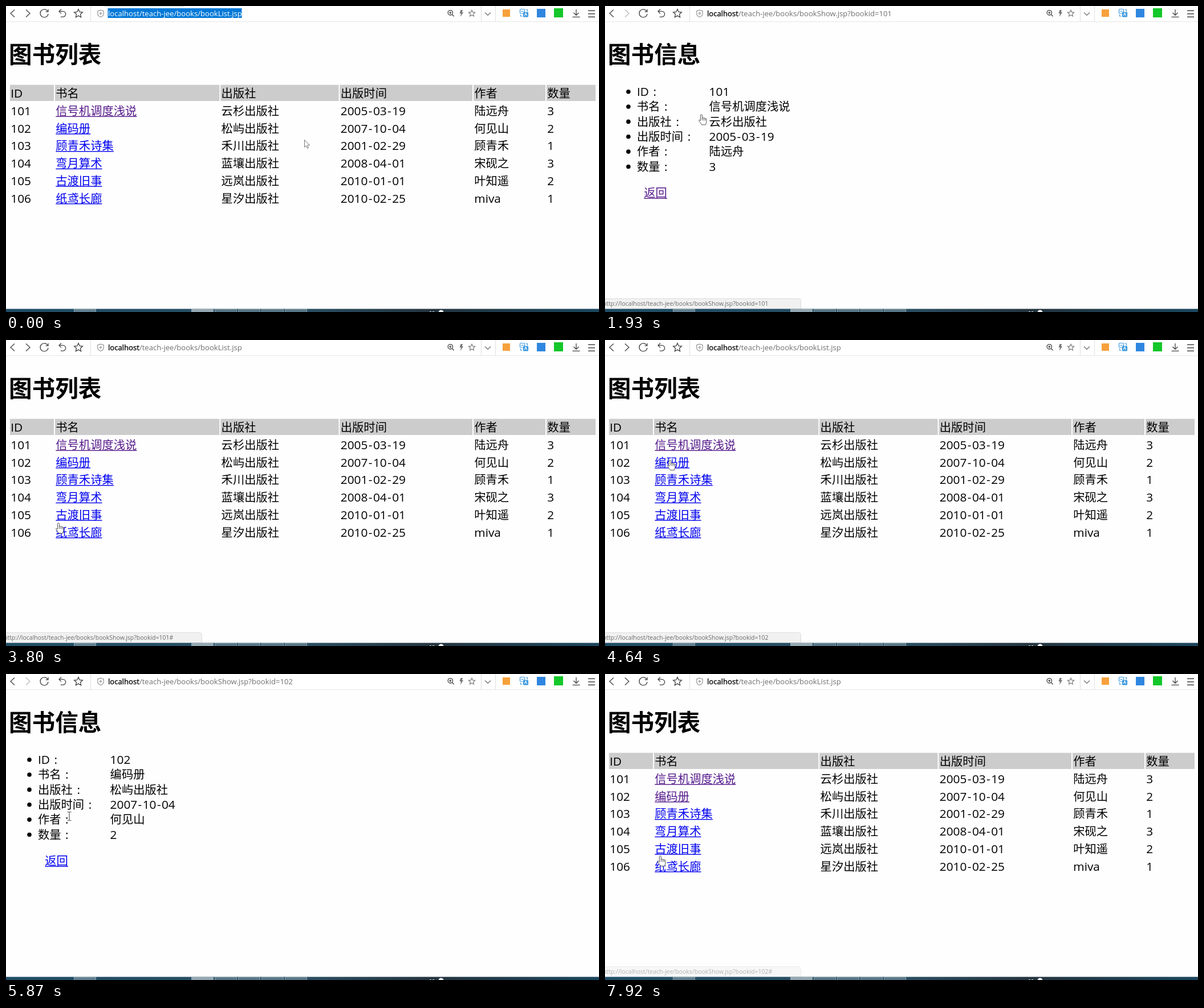
Recreate the animation shown at these times as an HTML page. Size 1040 px wide and 538 px high, loop 7990 ms.

```html
<!DOCTYPE html>
<html lang="zh-CN">
<head>
<meta charset="utf-8">
<title>图书列表</title>
<style>
html, body { margin: 0; width: 100%; height: 100%; overflow: hidden; background: #fff; }
svg { display: block; width: 1040px; height: 538px; }
text { font-family: "Noto Sans CJK SC", "Noto Sans CJK", sans-serif; font-size: 20.3px; }
.latin { font-family: "Open Sans", "Noto Sans", sans-serif; font-size: 20.8px; }
.url { font-family: "Open Sans", "Noto Sans", sans-serif; font-size: 13.1px; }
.small { font-family: "Open Sans", "Noto Sans", sans-serif; font-size: 10.5px; }
.title { font-size: 40.6px; font-weight: 700; }
.icon { fill: none; stroke: #444; stroke-width: 1.3; }
</style>
</head>
<body>
<svg viewBox="0 0 1040 538">
  <defs>
    <linearGradient id="bar">
      <stop offset="0" stop-color="#1f4d66"/><stop offset=".5" stop-color="#2a4f63"/>
      <stop offset=".72" stop-color="#243540"/><stop offset="1" stop-color="#1a475e"/>
    </linearGradient>
    <path id="star" d="M0-7.4 2.2-2.5 7.4-2 3.5 1.6 4.6 6.8 0 4.1-4.6 6.8-3.5 1.6-7.4-2-2.2-2.5Z"/>
  </defs>
  <rect width="1040" height="538" fill="#fff"/>
  <rect y="28" width="1040" height="505" fill="#fefefe"/>
  <g id="page"></g>

  <rect y="27" width="1040" height="1" fill="#e6e6e6"/>
  <g class="icon">
    <path d="M15 6.5 8 13l7 6.5"/>
    <path id="forward" d="M35 6.5 42 13l-7 6.5"/>
    <path d="M73 9.2a7 7 0 1 0 1 4.6M74 5.8v4.3h-4.4"/>
    <path d="M97 5.5 93 9.4l4 4M93.5 9.4h6.3a4.9 4.9 0 0 1 0 9.8h-4"/>
    <use href="#star" x="127" y="13"/>
    <path stroke="#e4e4e4" d="M148.5 0v27M833.5 0v27M858.5 0v27"/>
    <path stroke="#8a8a8a" stroke-width="1.1" d="M166 7.2 171.2 9v4.5q0 4-5.2 6-5.2-2-5.2-6V9ZM163.3 13h5.4M166 10.3v5.4"/>
    <circle cx="779.3" cy="11.8" r="4.2"/>
    <path d="M782.4 15 785.6 18.2M777.2 11.8h4.2M779.3 9.7v4.2"/>
    <path fill="#777" stroke="none" d="M797.5 7h3.5l-1.3 4h2.3l-5 8 .9-6h-2.4Z"/>
    <use href="#star" stroke="#777" stroke-width="1.5" transform="translate(817 12.8) scale(.76)"/>
    <path stroke="#777" d="m840 11.5 5 4.8 5-4.8"/>
    <path d="M1000 6v10M995.5 11.8l4.5 4.5 4.5-4.5M993.5 19.3h13"/>
    <path stroke-width="1.5" d="M1021 8.3h12M1021 13.8h12M1021 19.3h12"/>
  </g>
  <rect x="871" y="6" width="13" height="13" fill="#f6a13c"/>
  <g fill="none" stroke="#3f9be0" stroke-width="1.2">
    <rect x="901.5" y="5.5" width="8" height="7.5" rx="1"/>
    <rect x="907.5" y="11" width="8" height="8" rx="1" fill="#3f9be0"/>
    <path d="M903.5 9.3h4M911.5 6.5h3v3M902.5 15v3h3"/>
    <path stroke="#fff" d="m909.5 17 2-4.5 2 4.5"/>
  </g>
  <rect x="931" y="5" width="15" height="15" fill="#2f86e0"/>
  <rect x="961" y="4" width="16" height="16" fill="#14c72a"/>

  <g id="selection">
    <rect x="173" width="140" height="1" fill="#cfe3d8"/>
    <rect x="178.5" y="4" width="235" height="17" fill="#0078d7"/>
  </g>
  <text class="url" x="179" y="17.8"><tspan id="host" stroke-width=".3">localhost</tspan><tspan id="path"></tspan></text>

  <g id="status">
    <path d="M-1 514.5H339.5q4 0 4 4V533H-1Z" fill="#f1f1f1" stroke="#dcdcdc"/>
    <text class="small" id="link" x="-4" y="526.8" fill="#6a6a6a"></text>
  </g>

  <g id="taskbar"><rect y="532.5" width="1040" height="6" fill="url(#bar)"/></g>

  <g id="cursor" stroke="#555" fill="#fff">
    <path id="arrow" stroke="#777" d="M.5.5V13.3l3-2.7 2 4.6 2-.9-2-4.5h4.1Z"/>
    <path id="hand" d="M-1.6 1.2c0-1.8 3-1.8 3 0v5c.5-1.2 2.6-1 2.7.3.6-1 2.5-.7 2.6.5.7-.8 2.2-.4 2.2 1v4.5c0 2-1.2 3-1.2 5.3h-7.4c0-1.8-3.4-4.5-4.6-7.3-.5-1.4 1.2-2.2 2.7.3ZM1.4 6.2v4M4.1 6.5v4M6.7 7v3.5"/>
    <path id="beam" fill="none" stroke-width="1.2" d="M-3.5-7.5h2.5l1 .8 1-.8h2.5M-3.5 7.5h2.5l1-.8 1 .8h2.5M0-6.7V6.7"/>
  </g>
</svg>
<script>
const $ = id => document.getElementById(id);
const LOOP = 7990, TICK = 77, EM = 20.3, ROW = 30.7, ITEM = 26.35;
const BLUE = '#0000ee', PURPLE = '#551a8b', RED = '#ff0000';

const heads = ['ID', '书名', '出版社', '出版时间', '作者', '数量'];
const edges = [7, 86, 376.3, 585.5, 820, 948, 1036];
const books = [
  ['101', '信号机调度浅说', '云杉出版社', '2005-03-19', '陆远舟', '3'],
  ['102', '编码册', '松屿出版社', '2007-10-04', '何见山', '2'],
  ['103', '顾青禾诗集', '禾川出版社', '2001-02-29', '顾青禾', '1'],
  ['104', '弯月算术', '蓝壤出版社', '2008-04-01', '宋砚之', '3'],
  ['105', '古渡旧事', '远岚出版社', '2010-01-01', '叶知遥', '2'],
  ['106', '纸鸢长廊', '星汐出版社', '2010-02-25', 'miva', '1']
];

// Pointer moves: from, until, then the point reached
const moves = [
  [450, 1290, 168, 193], [1300, 1530, 169, 191], [2310, 3240, 92, 322], [3950, 4640, 114, 211],
  [5560, 5870, 111, 250], [5870, 6410, 179, 228], [6430, 6610, 172, 166],
  [6610, 7200, 107, 306], [7200, 7370, 97, 320]
];

// Each visit: press time, load time, book shown (-1 for the list)
const visits = [[-1e4, -9e3, -1], [1680, 1837, 0], [3560, 3710, -1], [4910, 5100, 1], [7580, 7750, -1]];

// Eased moves, shown in steps of one screen update
function pointer(t) {
  let x = 523, y = 235;
  for (const [from, until, toX, toY] of moves) {
    if (t < from) break;
    const steps = Math.floor((t - from) / TICK + 0.05);
    const p = t >= until ? 1 : Math.min(1, steps * TICK / (until - from));
    const e = p * p * (3 - 2 * p);
    x += (toX - x) * e;
    y += (toY - y) * e;
  }
  return [x, y];
}

function text(x, y, s, fill = '#000') {
  const latin = /^[\w-]+$/.test(s);
  const body = /^\d+-/.test(s)
    ? s.split('-').map((p, i) => i ? `<tspan dx="1.4">-</tspan><tspan dx="1.4">${p}</tspan>` : p).join('')
    : s;
  return `<text x="${x}" y="${y}"${latin ? ' class="latin"' : ''} fill="${fill}">${body}</text>`;
}

const anchor = (x, y, s, fill) => text(x, y, s, fill) +
  `<rect x="${x}" y="${y + 1.6}" width="${s.length * EM}" height="1.4" fill="${fill}"/>`;

const title = s => `<text class="title" x="5" y="100">${s}</text>`;

function listPage(pressed, visited) {
  let out = title('图书列表');
  heads.forEach((head, c) => {
    const x = edges[c] + 1.3, width = edges[c + 1] - edges[c] - 2;
    out += `<rect x="${edges[c]}" y="138.6" width="${width}" height="28.4" fill="#ccc"/>` + text(x, 161, head);
    books.forEach((book, r) => {
      const y = 192 + r * ROW;
      const fill = r === pressed ? RED : r <= visited ? PURPLE : BLUE;
      out += c === 1 ? anchor(x, y, book[c], fill) : text(x, y, book[c]);
    });
  });
  return out;
}

function showPage(n, pressed) {
  let out = title('图书信息');
  heads.forEach((h, i) => {
    const y = 158 + i * ITEM;
    const colon = 56 + (h === 'ID' ? 21 : h.length * EM) + 7.5;
    out += `<circle cx="41" cy="${y - 7.3}" r="3.8"/>` + text(56, y, h) +
      `<text class="latin" x="${colon}" y="${y}">:</text>` + text(182.6, y, books[n][i]);
  });
  return out + anchor(68.3, 336, '返回', pressed ? RED : n ? BLUE : PURPLE);
}

// What lies under the pointer: a link address, plain text or nothing
function under(x, y, shown) {
  if (shown < 0) {
    const r = Math.round((y - 184.5) / ROW);
    const book = books[r];
    const hit = book && Math.abs(y - 184.5 - r * ROW) < 14 && x > 87 && x < 87.3 + book[1].length * EM;
    return hit ? { link: 'bookShow.jsp?bookid=' + book[0] } : {};
  }
  if (y > 314 && y < 342 && x > 68 && x < 109) return { link: `bookShow.jsp?bookid=${books[shown][0]}#` };
  const h = heads[Math.round((y - 150.5) / ITEM)];
  return { text: !!h && x > 56 && x < 56 + (h.length + 1) * EM };
}

let drawn = '';
function draw(t) {
  const at = visits.filter(v => v[1] <= t).length - 1;
  const [, loaded, shown] = visits[at];
  const next = visits[at + 1];
  const pressed = !!next && t >= next[0];
  const [x, y] = pointer(t);

  // A fresh page keeps the old pointer and address for a moment
  const age = Math.floor((t - loaded) / TICK), held = age < 4;
  const spot = held ? under(...pointer(loaded), visits[at - 1][2]) : under(x, y, shown);
  const visited = at >= 3 ? 1 : 0;

  const key = [shown, pressed, visited].join();
  if (key !== drawn) {
    drawn = key;
    $('page').innerHTML = shown < 0 ? listPage(pressed ? next[2] : -1, visited) : showPage(shown, pressed);
  }

  const selected = t < visits[1][0];
  const name = shown < 0 ? 'bookList.jsp' : 'bookShow.jsp?bookid=' + books[shown][0];
  $('selection').style.display = selected ? '' : 'none';
  $('host').setAttribute('fill', selected ? '#fff' : '#000');
  $('host').setAttribute('stroke', selected ? 'none' : '#000');
  $('path').setAttribute('fill', selected ? '#fff' : '#707070');
  $('path').textContent = '/teach-jee/books/' + name;
  $('forward').setAttribute('stroke', shown < 0 ? '#444' : '#bbb');

  const fade = !held || age < 2 ? 1 : age < 3 ? 0.5 : 0;
  $('status').setAttribute('opacity', spot.link ? fade : 0);
  $('link').textContent = spot.link ? 'http://localhost/teach-jee/books/' + spot.link : '';

  const shape = spot.link ? 'hand' : spot.text ? 'beam' : 'arrow';
  for (const s of ['arrow', 'hand', 'beam']) $(s).style.display = s === shape ? '' : 'none';
  $('cursor').setAttribute('transform', `translate(${Math.round(x)} ${Math.round(y)})`);
}

function buildTaskbar() {
  const button = (x, opacity) => `<rect x="${x + .5}" y="533" width="38" height="7" fill="#fff"
    fill-opacity="${opacity}" stroke="#b9c8cf" stroke-opacity=".6"/>`;
  let out = button(119, .28);
  for (let i = 0; i < 5; i++) out += button(325 + i * 41, i ? .22 : .5);
  out += '<path d="M743 537.5h8" stroke="#ddd" stroke-dasharray="3 2"/><circle cx="763" cy="539" r="4.5" fill="#fff"/>';
  $('taskbar').innerHTML += out;
}

buildTaskbar();
const start = performance.now();
function tick() {
  draw((performance.now() - start) % LOOP);
  requestAnimationFrame(tick);
}
tick();
</script>
</body>
</html>
```
